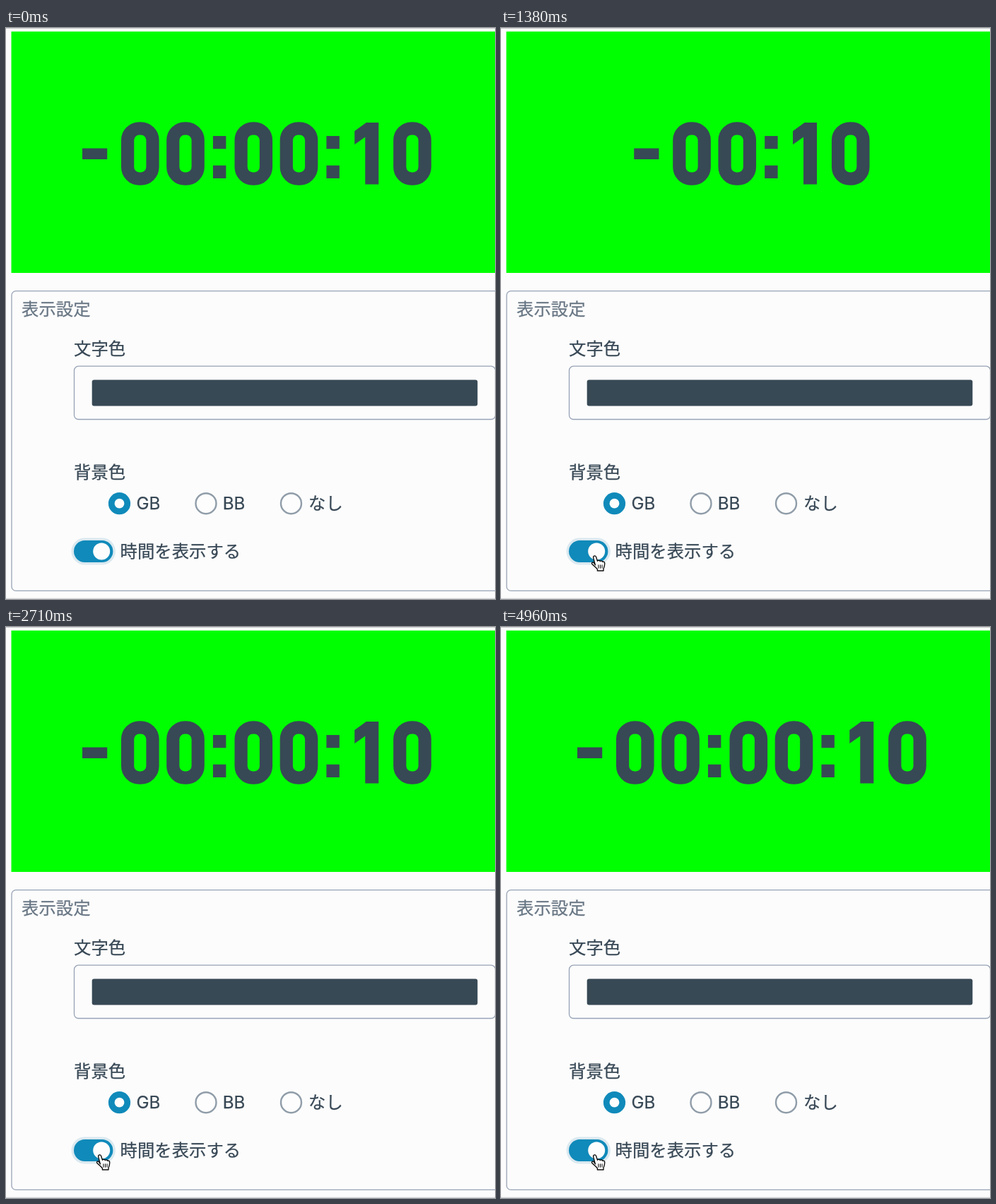
These frames come from a looping animation (692 px wide and 809 px high, 5 s). An HTML page:

```html
<!DOCTYPE html>
<html lang="ja">
<head>
<meta charset="utf-8">
<title>表示設定</title>
<style>
  html, body { margin: 0; width: 100%; height: 100%; overflow: hidden; background: #fcfcfc; }
  svg { display: block; width: 692px; height: 809px; }
  text { font: 24.4px 'Noto Sans CJK JP', 'Noto Sans CJK', sans-serif; fill: #374755; stroke: #374755; stroke-width: .25; }
  .title { fill: #687684; stroke: #687684; }
  .latin { font-family: Inter, Roboto, sans-serif; font-size: 24.2px; }
  .box { fill: none; stroke: #97a3b6; stroke-width: 1.3; }
  .radio { fill: #fdfdfd; stroke: #909da9; stroke-width: 2.4; }
</style>
</head>
<body>
<svg viewBox="0 0 692 809">
  <defs>
    <rect id="zero" x="-17.7" y="142.4" width="35.4" height="71.2" rx="16.5"
      fill="none" stroke="#374955" stroke-width="18.2"/>
    <path id="one" d="M-1 134H16.5V221.5H-2.5V154.5L-17.5 165V146Z" fill="#374955"/>
    <path id="colon" d="M-9.2 153H9.2V171.3H-9.2ZM-9.2 194.7H9.2V213H-9.2Z" fill="#374955"/>
    <path id="minus" d="M-17.6 170.5H17.6V186H-17.6Z" fill="#374955"/>
  </defs>

  <rect width="692" height="809" fill="#fcfcfc"/>
  <path d="M0 .5H692M0 808.3H692" stroke="#c9cacd"/>
  <rect x="7.5" y="5" width="690" height="342" fill="#0f0"/>
  <g id="timer" role="img"></g>

  <rect class="box" x="8" y="372.6" width="720" height="424.8" rx="6"/>
  <text class="title" x="22" y="407.3">表示設定</text>

  <text x="96" y="463">文字色</text>
  <rect class="box" x="96.5" y="479.2" width="596" height="75.3" rx="6"/>
  <rect x="121.7" y="498.5" width="545.6" height="37" rx="3" fill="#374955"/>

  <text x="96" y="638.3">背景色</text>
  <circle cx="160.5" cy="673.7" r="15.6" fill="#108aba"/>
  <circle cx="160.5" cy="673.7" r="6.9" fill="#fdfdfd"/>
  <circle class="radio" cx="283" cy="673.7" r="14.5"/>
  <circle class="radio" cx="403.5" cy="673.7" r="14.5"/>
  <text class="latin" x="184.4" y="682.2">GB</text>
  <text class="latin" x="306.8" y="682.2">BB</text>
  <text x="428" y="682">なし</text>

  <rect x="92.5" y="722.4" width="62.4" height="38.2" rx="19.1" fill="#dbe9f0"/>
  <rect id="track" x="96" y="726" width="55.4" height="31" rx="15.5"/>
  <circle id="knob" cy="741.5" r="12" fill="#fdfdfd"/>
  <text x="161.5" y="749.8">時間を表示する</text>

  <g id="cursor">
    <path id="arrow" d="M0 0V17.6L4 13.9L7.2 21L10.5 19.6L7.4 12.6H12.8Z"
      fill="#111" stroke="#fff" stroke-width="1.7" stroke-linejoin="round" paint-order="stroke"/>
    <g id="hand" stroke="#111" stroke-width="1.4" stroke-linejoin="round" stroke-linecap="round">
      <path fill="#fff" d="M2.2 13.4L-.5 3C-1.2 .2 2.5 -.8 3.4 1.8L5.3 7.6C6.1 6.2 8.4 6.3 9 8
        C10.1 6.8 12 7.2 12.5 8.8C13.8 8 15.4 8.8 15.5 10.4C15.7 14 14.8 16.4 13.8 18.5V21.4H5.2V19.2
        C3.5 16.8 .5 14.7 -2 12.2C-3.6 10.4 -1.8 8.7 0 9.9Z"/>
      <path fill="none" d="M6.7 13.2V17.7M9.3 13.2V17.7M11.8 13.2V17.4" stroke-width="1.1"/>
    </g>
  </g>
</svg>
<script>
  const LOOP = 5000, ENTER_AT = 480, OFF_AT = 1360, ON_AT = 2510, SLIDE = 180;
  const PITCH = 64.2, MID = 350.3;
  const GLYPHS = { '-': 'minus', ':': 'colon', '0': 'zero', '1': 'one' };
  const $ = id => document.getElementById(id);
  const clamp = v => Math.max(0, Math.min(1, v));
  const mix = (a, b, k) => a + (b - a) * k;
  const smooth = k => k * k * (3 - 2 * k);
  const easeOut = k => 1 - (1 - k) ** 3;
  const show = (id, on) => $(id).setAttribute('visibility', on ? 'visible' : 'hidden');

  let shown = '';
  function setTimer(str) {
    if (str === shown) return;
    shown = str;
    const widths = [...str].map(c => c === ':' ? PITCH / 2 : PITCH);
    let x = MID - widths.reduce((a, b) => a + b) / 2;
    $('timer').innerHTML = [...str].map((c, i) => {
      const cx = x + widths[i] / 2;
      x += widths[i];
      return `<use href="#${GLYPHS[c]}" x="${cx.toFixed(2)}"/>`;
    }).join('');
    $('timer').setAttribute('aria-label', str);
  }

  function setToggle(k) {
    const rgb = [[170, 184, 194], [16, 138, 186]];
    const color = rgb[0].map((v, i) => Math.round(mix(v, rgb[1][i], k)));
    $('track').setAttribute('fill', `rgb(${color})`);
    $('knob').setAttribute('cx', mix(111.5, 135.2, k));
  }

  function setCursor(t) {
    const enter = easeOut(clamp((t - ENTER_AT) / 340));
    const settle = smooth(clamp((t - 840) / 200));
    const x = mix(mix(176, 142.7, enter), 131.2, settle);
    const y = mix(mix(815, 757, enter), 747.6, settle);
    const over = settle > .15;
    $('cursor').setAttribute('transform', `translate(${x.toFixed(2)} ${y.toFixed(2)})`);
    show('arrow', t >= ENTER_AT && !over);
    show('hand', over);
  }

  function draw(t) {
    setTimer(t >= OFF_AT && t < ON_AT ? '-00:10' : '-00:00:10');
    // The switch starts sliding just after the timer changes.
    const off = smooth(clamp((t - OFF_AT - 20) / SLIDE));
    const on = smooth(clamp((t - ON_AT - 20) / SLIDE));
    setToggle(1 - off + on);
    setCursor(t);
  }

  const start = performance.now();
  function tick() {
    draw((performance.now() - start) % LOOP);
    requestAnimationFrame(tick);
  }
  draw(0);
  requestAnimationFrame(tick);
</script>
</body>
</html>
```
